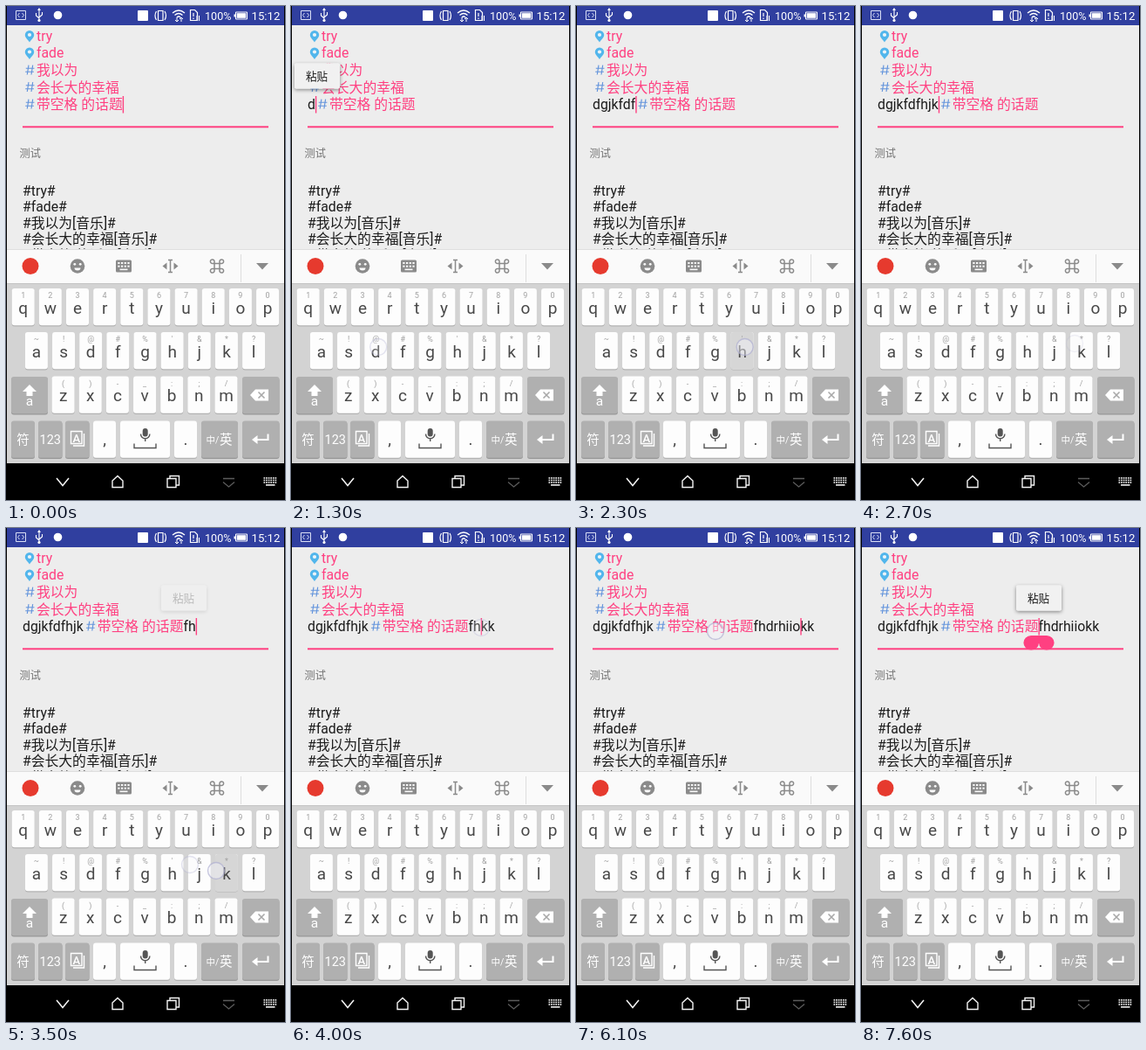
An HTML page with a canvas that plays this animation: 320 by 565 pixels, repeating every 8 s.

```html
<!DOCTYPE html>
<html lang="zh">
<head>
<meta charset="utf-8">
<style>
html, body { margin: 0; width: 100%; height: 100%; overflow: hidden; background: #000; }
canvas { display: block; width: 320px; height: 565px; }
</style>
</head>
<body>
<canvas id="stage"></canvas>
<script>
const W = 320, H = 565, LOOP = 8000;
const canvas = document.getElementById('stage');
const ctx = canvas.getContext('2d');
const dpr = window.devicePixelRatio || 1;
canvas.width = W * dpr;
canvas.height = H * dpr;

const FONT = 'Roboto, "Noto Sans CJK SC", "Noto Sans CJK", sans-serif';
const PINK = '#ff4081', INK = '#1c1c1c', GREY = '#8a8a8a', HASH = '#6394dc', PIN = '#52b6ec';
const BODY = 15.8, LEFT = 19, ICON = 16, LINE = 118;
const TOPIC = '带空格 的话题';

function text(s, x, y, size, color, align = 'left', weight = 400) {
  ctx.font = `${weight} ${size}px ${FONT}`;
  ctx.fillStyle = color;
  ctx.textAlign = align;
  ctx.fillText(s, x, y);
}
function width(s) {
  ctx.font = `400 ${BODY}px ${FONT}`;
  return ctx.measureText(s).width;
}
function rect(x, y, w, h, color) {
  ctx.fillStyle = color;
  ctx.fillRect(x, y, w, h);
}
function round(x, y, w, h, r, color) {
  ctx.beginPath();
  ctx.roundRect(x, y, w, h, r);
  ctx.fillStyle = color;
  ctx.fill();
}
function disc(x, y, r, color) {
  ctx.beginPath();
  ctx.arc(x, y, r, 0, 7);
  ctx.fillStyle = color;
  ctx.fill();
}
// SVG path, filled when lw is 0
function path(d, color, lw = 0, x = 0, y = 0) {
  ctx.save();
  ctx.translate(x, y);
  const p = new Path2D(d);
  if (lw) {
    ctx.lineWidth = lw;
    ctx.strokeStyle = color;
    ctx.stroke(p);
  } else {
    ctx.fillStyle = color;
    ctx.fill(p);
  }
  ctx.restore();
}

// ---- keyboard layout ----
const rows = [
  ['qwertyuiop', '1234567890', 19.7, 323],
  ['asdfghjkl', '~!@#%\'&*?', 34.9, 373],
  ['zxcvbnm', '()-_:;/', 65.6, 423.5]
];
const keys = {};
for (const [letters, alts, x0, y] of rows) {
  [...letters].forEach((c, i) => { keys[c] = { c, alt: alts[i], x: x0 + i * 31.15, y }; });
}

// ---- timeline: [time, inserted letter or new caret index or null, touch x, touch y] ----
const events = [
  [200, 0, 22, 112],
  [1300, 'd'], [1450, 'g'], [1600, 'j'], [1750, 'k', 239],
  [1990, 'f', 141, 390], [2100, 'd'], [2200, 'f'], [2350, 'h'], [2500, 'j'], [2650, 'k', 245, 386],
  [2900, 11, 205, 114],
  [3400, 'f'], [3500, 'h', 211, 385], [3590, 'k', 241, 392], [3700, 'k', 243, 392],
  [4000, 13, 218, 114],
  [4200, 'd'], [4300, 'r'], [4400, 'h'], [4540, 'i', 235, 360], [4650, 'i', 253, 364], [4700, 'o', 256, 364],
  [6190, 11, 160, 118], [6700, null, 103, 116], [7000, null, 160, 116], [7300, 11, 200, 116]
].map(([t, op, x, y]) => {
  const key = keys[op];
  return { t, op, key, x: x ?? key.x + 3, y: y ?? key.y + 17 };
});
const popups = [[300, 1300, 3], [2950, 3400, 177], [7200, 9000, 177]];
const HOLD = 95, TOUCH_FADE = 100, POPUP_FADE = 200;

// The topic is one token, written as §
function editor(t) {
  let s = '§', caret = 1, last = 0;
  for (const { t: at, op } of events) {
    if (at > t) break;
    if (op === null) continue;
    if (typeof op === 'number') caret = op;
    else {
      s = s.slice(0, caret) + op + s.slice(caret);
      caret++;
    }
    last = at;
  }
  return { s, caret, on: Math.floor((t - last) / 500) % 2 === 0 };
}
const isDown = (t, e) => t >= e.t - HOLD && t < e.t;
function touchAlpha(t, e) {
  if (isDown(t, e)) return 1;
  return t < e.t ? 0 : Math.max(0, 0.5 * (1 - (t - e.t) / TOUCH_FADE));
}

function hash(x, base) {
  path('M4-11.300L2.300-.500M8.700-11.300L7-.500M.800-7.800H10.500M.200-3.800H9.900', HASH, 1.15, x + 3, base);
}
function pin(x, base) {
  path('M0 4C-2 1-5.2-1-5.2-4.4A5.2 5.2 0 0 1 5.2-4.4C5.2-1 2 1 0 4Z', PIN, 0, x, base - 2);
  disc(x, base - 6.5, 2.1, '#eef4f8');
}

function statusBar() {
  rect(0, 0, W, 22, '#303f9f');
  const c = '#fff';
  path('M11.5 5.5h11v10h-11zM15.5 8l-2 2.5 2 2.5M18.5 8l2 2.5-2 2.5', '#d9def5', 1);
  path('M38 4V17M34.5 8v3l3.5 3M41.5 7v3l-3.5 3', c, 1.1);
  path('M38 2l2 3h-4z', c);
  disc(38, 16.5, 1.6, c);
  disc(59.5, 10.5, 4.8, c);
  round(151, 5, 12, 12, 1, c);
  path('M174.500 5.500h5.500v11h-5.500zM172.500 6q-3 5 0 10M182 6q3 5 0 10', c, 1.2);
  path('M191 8q7-6 14 0M193.500 10.500q4.500-4 9 0M196 13q2-2 4 0', c, 1.3);
  path('M196 13v5M194 16l2 2 2-2M201 18v-5M199 15l2-2 2 2', c, 1);
  path('M211.500 4.500h5l3 3v9h-8zM215 8v4M215 13.500v1.500', c, 1.2);
  path('M219 11v6M221.500 11v6', c, 1);
  text('100%', 228, 15.7, 12.6, c);
  path('M263.500 7h13v8h-13z', c, 1);
  rect(264.7, 8.2, 10.6, 5.6, c);
  rect(261.5, 9.5, 1.5, 3, c);
  text('15:12', 281.5, 16, 13.2, c);
}

function content(t) {
  rect(0, 22, W, 256, '#ededed');
  [['try', 39.5], ['fade', 59]].forEach(([s, y]) => {
    pin(27, y);
    text(s, 35, y, BODY, PINK);
  });
  [['我以为', 79], ['会长大的幸福', 98.5]].forEach(([s, y]) => {
    hash(LEFT, y);
    text(s, LEFT + ICON, y, BODY, PINK);
  });

  const { s, caret, on } = editor(t);
  const [pre, post] = s.split('§');
  const spanX = LEFT + width(pre);
  const spanEnd = spanX + ICON + width(TOPIC);
  text(pre, LEFT, LINE, BODY, INK);
  hash(spanX, LINE);
  text(TOPIC, spanX + ICON, LINE, BODY, PINK);
  text(post, spanEnd, LINE, BODY, INK);
  if (on) {
    const x = caret > pre.length
      ? spanEnd + width(post.slice(0, caret - pre.length - 1))
      : LEFT + width(pre.slice(0, caret));
    rect(x, 103, 1.4, 19.5, PINK);
  }
  rect(LEFT, 137.3, 282, 2, PINK);
  if (t >= 7400) {
    path('M0 0H-9A8.800 8.300 0 1 0 0 8.500ZM0 0H9A8.800 8.300 0 1 1 0 8.500Z', PINK, 0, 204, 123);
  }

  text('测试', 15.5, 173, 12.2, '#757575');
  ['try', 'fade', '我以为[音乐]', '会长大的幸福[音乐]', TOPIC + '[音乐]'].forEach((line, i) =>
    text(`#${line}#`, LEFT, 216.5 + i * 18.6, BODY, INK));
}

function toolbar() {
  rect(0, 278, W, 40, '#fafafa');
  rect(0, 278, W, 1, '#dedede');
  disc(28, 297.5, 9.5, '#e63a2e');
  disc(82, 297.5, 8.3, GREY);
  disc(78.8, 295.3, 1.4, '#fafafa');
  disc(85.2, 295.3, 1.4, '#fafafa');
  path('M78.500 299.500h7a3.500 3 0 0 1-7 0z', '#fafafa');
  round(126, 290.5, 18, 14, 1.5, GREY);
  for (let r = 0; r < 2; r++) {
    for (let i = 0; i < 4; i++) rect(128.3 + i * 3.7, 293 + r * 3.7, 2.2, 2, '#fafafa');
  }
  rect(130.5, 300.6, 9, 1.6, '#fafafa');
  path('M188.500 291v13M186 290.500h5M186 304.500h5', GREY, 1.5);
  path('M179.500 297.500l5-4v8zM197.500 297.500l-5-4v8z', GREY);
  path('M-3-3H3V3H-3ZM-3-3H-5A2.300 2.300 0 1 1-3-5ZM3-3V-5A2.300 2.300 0 1 1 5-3ZM3 3H5A2.300 2.300 0 1 1 3 5ZM-3 3V5A2.300 2.300 0 1 1-5 3Z', GREY, 1.5, 242, 297.5);
  rect(269, 284, 1, 32, '#dddddd');
  path('M287 294h14l-7 7.500z', GREY);
}

function key(x, y, w, dark) {
  round(x, y + 1, w, 42.5, 3, dark ? '#989898' : '#b2b2b2');
  round(x, y, w, 42.3, 3, dark ? '#b0b0b0' : '#fdfdfd');
}

function keyboard(t) {
  rect(0, 317, W, 206, '#d3d3d3');
  rect(0, 317, W, 1, '#c4c4c4');
  for (const k of Object.values(keys)) {
    key(k.x - 13, k.y, 26, false);
    if (events.some(e => e.key === k && isDown(t, e))) {
      round(k.x - 13, k.y, 26, 43, 3, '#d6d6d6');
    }
    text(k.alt, k.x, k.y + 11, 9, '#a0a0a0', 'center');
    text(k.c, k.x, k.y + 28.5, 19, '#484848', 'center');
  }

  key(6, 424, 42, true);
  path('M27 433l8 8h-4.500v5h-7v-5H19z', '#fff');
  text('a', 27, 456.5, 15.5, '#fff', 'center');
  key(271, 424, 42.5, true);
  path('M280 445l6-6.500h15v13h-15z', '#fff');
  path('M289.500 441.500l7 7M296.500 441.500l-7 7', '#a8a8a8', 1.6);

  key(6, 474.5, 27, true);
  text('符', 19.5, 501, 14.5, '#fff', 'center');
  key(37, 474.5, 27.5, true);
  text('123', 50.7, 501, 14.5, '#fff', 'center');
  key(68, 474.5, 27.5, true);
  path('M74.500 486.500h12.500v14h-12.500zM77 503h12.500V489', '#fff', 1.4);
  text('A', 80.8, 498.5, 13, '#fff', 'center', 500);
  key(100, 474.5, 26, false);
  text(',', 113, 502, 19, '#484848', 'center');
  key(131, 474.5, 57, false);
  round(156.7, 483, 6, 9.5, 3, '#555');
  path('M154.500 489.500a5.200 5.200 0 0 0 10.400 0M159.700 495v3M147 500.500v5h25v-5', '#555', 1.4);
  key(193, 474.5, 26, false);
  text('.', 206, 502, 19, '#484848', 'center');
  key(224, 474.5, 42, true);
  text('中/', 229.5, 500, 10.5, '#fff');
  text('英', 245, 501, 14.5, '#fff');
  key(271, 474.5, 42.5, true);
  path('M300.500 489.500v6.500H286', '#fff', 2);
  path('M282 496l6.500-5v10z', '#fff');
}

function navBar() {
  rect(0, 523, W, 42, '#000');
  path('M58 540l7 8.500 7-8.500', '#f4f4f4', 1.5);
  path('M122 543l6-5.500 6 5.500v7.500h-12z', '#f4f4f4', 1.4);
  path('M185 540.500h10v10h-10zM188 540v-2.500h10.500v10.500H195.500', '#f4f4f4', 1.4);
  path('M249 540.500h13M249 544.500l6.500 5.500 6.500-5.500', '#5c5c5c', 1.3);
  for (let r = 0; r < 3; r++) {
    for (let i = 0; i < 6; i++) rect(295.5 + i * 2.6, 539 + r * 2.6, 1.7, 1.7, '#e6e6e6');
  }
  rect(298, 547, 10.5, 1.7, '#e6e6e6');
}

function popup(t) {
  for (const [start, end, x] of popups) {
    const a = Math.min((t - start) / POPUP_FADE, 1 - (t - end) / POPUP_FADE, 1);
    if (a <= 0) continue;
    ctx.save();
    ctx.globalAlpha = a;
    // keep the shadow outside the translucent card
    ctx.save();
    const outside = new Path2D();
    outside.rect(0, 0, W, H);
    outside.roundRect(x + 1, 65.5, 52, 29, 2);
    ctx.clip(outside, 'evenodd');
    ctx.shadowColor = `rgba(0,0,0,${0.45 * a})`;
    ctx.shadowBlur = 4 * dpr;
    ctx.shadowOffsetY = 1.5 * dpr;
    round(x + 1, 65.5, 52, 29, 2, '#f1f1f1');
    ctx.restore();
    round(x + 1, 65.5, 52, 29, 2, '#f1f1f1');
    ctx.globalAlpha = a * a;
    text('粘贴', x + 26.5, 84.7, 12.6, INK, 'center', 500);
    ctx.restore();
  }
}

function touches(t) {
  for (const e of events) {
    const a = touchAlpha(t, e);
    if (!a) continue;
    ctx.save();
    ctx.globalAlpha = a;
    disc(e.x, e.y, 9.5, 'rgba(245,245,250,.45)');
    ctx.lineWidth = 1.4;
    ctx.strokeStyle = 'rgba(170,170,208,.65)';
    ctx.stroke();
    ctx.restore();
  }
}

function draw(t) {
  ctx.setTransform(dpr, 0, 0, dpr, 0, 0);
  content(t);
  toolbar();
  keyboard(t);
  statusBar();
  popup(t);
  touches(t);
  navBar();
  rect(0, 0, 1, H, '#000');
  rect(W - 1, 0, 1, H, '#000');
}

const begin = performance.now();
function tick() {
  draw((performance.now() - begin) % LOOP);
  requestAnimationFrame(tick);
}
tick();
</script>
</body>
</html>
```
